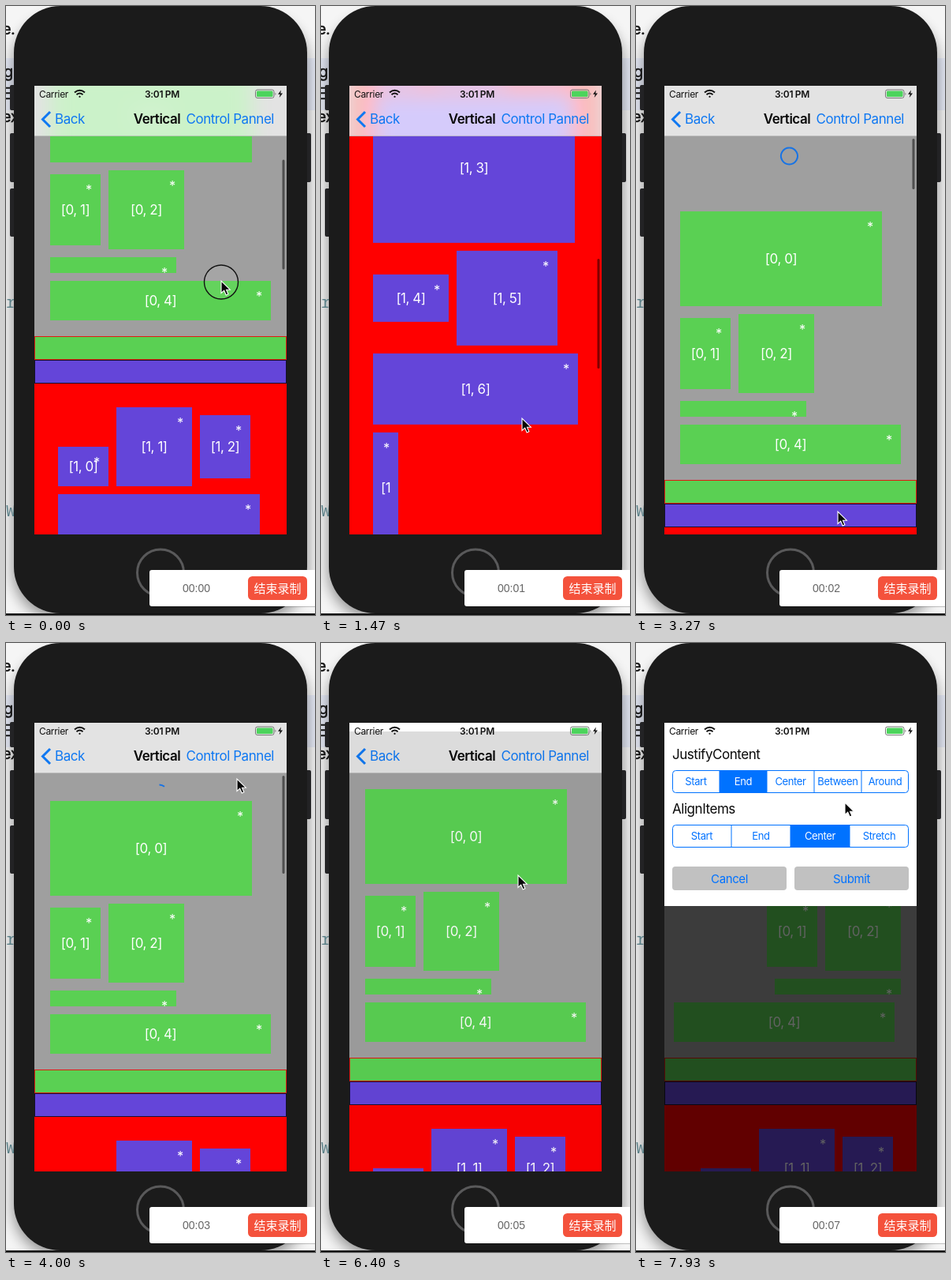
Animation of 392x771 px, one loop 8 s. Source, as an HTML page:

```html
<!DOCTYPE html>
<html lang="en">
<head>
<meta charset="utf-8">
<title>Flex layout demo</title>
<style>
  html, body { margin: 0; width: 100%; height: 100%; overflow: hidden; background: #f4f4f4; }
  svg { display: block; width: 100vw; height: 100vh; font-family: Inter, Roboto, sans-serif; }
  text { letter-spacing: -.027em; }
  .mid { text-anchor: middle; }
  .ui { font-size: 17px; }
  .code { font: 20px "Noto Sans Mono", monospace; fill: #5b8088; }
  .clock { font: 14px "Liberation Sans", Arial, sans-serif; letter-spacing: 0; }
  .stop { font: 15px "Noto Sans CJK SC", "Noto Sans CJK", sans-serif; letter-spacing: 0; }
</style>
</head>
<body>
<svg viewBox="0 0 392 771" preserveAspectRatio="none">
  <defs>
    <clipPath id="screen"><rect x="36" y="101" width="320" height="568"/></clipPath>
    <clipPath id="bar"><rect x="36" y="101" width="320" height="64"/></clipPath>
    <filter id="frost" filterUnits="userSpaceOnUse" x="0" y="50" width="392" height="170" color-interpolation-filters="sRGB">
      <feGaussianBlur stdDeviation="13"/>
      <feColorMatrix type="saturate" values="1.3"/>
    </filter>
    <filter id="soft" x="-20%" y="-10%" width="140%" height="120%"><feGaussianBlur stdDeviation="9"/></filter>
  </defs>

  <!-- desktop -->
  <rect width="392" height="771" fill="#f5f5f5"/>
  <rect y="66" width="392" height="66" fill="#e6eaf6"/>
  <rect x="9" y="14" width="374" height="762" rx="60" opacity=".42" filter="url(#soft)"/>
  <g font-size="20" fill="#111" stroke="#111" stroke-width=".4">
    <text x="-5" y="36">e.</text>
    <text x="-3" y="90">gl</text>
    <text x="-5" y="118">E</text>
    <text x="-5" y="147">ex</text>
  </g>
  <text class="code" y="382">r</text>
  <text class="code" y="646">W</text>
  <rect y="769" width="392" height="2" fill="#111"/>

  <!-- phone body -->
  <g fill="#232325">
    <rect x="5" y="100" width="8" height="32" rx="2"/>
    <rect x="5" y="161" width="8" height="62" rx="2"/>
    <rect x="5" y="231" width="8" height="61" rx="2"/>
    <rect x="379" y="161" width="8" height="62" rx="2"/>
  </g>
  <rect x="10" width="372" height="769" rx="59" fill="#1b1b1b"/>
  <circle cx="196" cy="717.5" r="29.5" fill="none" stroke="#59595a" stroke-width="3"/>

  <g clip-path="url(#screen)">
    <rect x="36" y="101" width="320" height="568" fill="#9f9f9f"/>
    <path id="spinner" fill="none" stroke="#1673e6" stroke-width="2" d="M194.5 179.5A10.5 10.5 0 1 1 194.4 179.5"/>
    <g id="content"></g>
    <rect id="thumb" x="350.5" width="3" rx="1.5"/>

    <!-- navigation bar -->
    <g clip-path="url(#bar)">
      <rect x="36" y="101" width="320" height="64" fill="#9f9f9f"/>
      <g filter="url(#frost)"><use href="#content"/></g>
      <rect x="36" y="101" width="320" height="64" fill="#fafafa" opacity=".75"/>
    </g>
    <rect x="36" y="164.5" width="320" height=".5" fill="#999"/>
    <path d="M56 134l-9.5 9.5 9.5 9.5" fill="none" stroke="#0f78f2" stroke-width="3"/>
    <g class="ui" fill="#0f78f2">
      <text x="62" y="149">Back</text>
      <text x="340" y="149" text-anchor="end">Control Pannel</text>
      <text x="191.5" y="149" class="mid" font-weight="600" fill="#080808">Vertical</text>
    </g>

    <rect id="dim" x="36" y="101" width="320" height="568"/>
    <g id="panel"></g>

    <!-- status bar -->
    <g fill="#111" font-size="12">
      <text x="42" y="115.5">Carrier</text>
      <text x="198" y="115.5" class="mid" font-weight="600">3:01 PM</text>
    </g>
    <path d="M87 109.5q6.5-5.5 13 0M89.5 112.200q4-3.300 8 0" fill="none" stroke="#111" stroke-width="2"/>
    <path d="M93.5 113.5l1.500 1.500-1.500 1-1.500-1z" fill="#111"/>
    <rect x="316.5" y="106" width="23.5" height="10.5" rx="2.5" fill="none" stroke="#777"/>
    <rect x="318" y="107.5" width="20.5" height="7.5" rx="1.3" fill="#4cd45c"/>
    <path d="M341.5 109.5v3.500q2-1.700 0-3.500z" fill="#777"/>
    <path d="M349 106.5l-4 5.300h2.700l-1 4.200 4.300-5.500h-2.800z" fill="#111"/>
  </g>

  <!-- recorder -->
  <rect x="182" y="714.5" width="214" height="46.500" rx="3" opacity=".22"/>
  <rect x="182" y="714" width="214" height="46" rx="3" fill="#fff"/>
  <text id="clock" x="241.5" y="742" class="mid clock" fill="#666"></text>
  <rect x="307" y="722" width="75" height="30" rx="5.500" fill="#f4523c"/>
  <text x="344.5" y="742.5" class="mid stop" fill="#fff">结束录制</text>

  <!-- pointer -->
  <g id="pointer">
    <circle id="touch" cy="1.500" r="21.500" fill="#fff" fill-opacity=".06" stroke="#111" stroke-width="1.400"/>
    <path d="M0 0V15.500L3.700 12.200 6.200 18 8.900 16.800 6.500 11.200H11.300Z" fill="#080808" stroke="#fff" stroke-width="1.100"/>
  </g>
</svg>

<script>
const LOOP = 8000, STEP = 1000 / 15;
const LEFT = 36, WIDTH = 320, GAP = 10, BAR = 30;
const GREEN = '#5ad053', PURPLE = '#6445d9', BLUE = '#0072ff';
const $ = id => document.getElementById(id);

function add(parent, tag, attrs, text) {
  const el = document.createElementNS('http://www.w3.org/2000/svg', tag);
  set(el, attrs);
  if (text) el.textContent = text;
  return parent.appendChild(el);
}
function set(el, attrs) {
  for (const k in attrs) el.setAttribute(k, attrs[k]);
}
const box = (parent, x, y, width, height, fill, more) =>
  add(parent, 'rect', { x, y, width, height, fill, ...more });
const label = (parent, x, y, text, size, fill) =>
  add(parent, 'text', { x, y, class: 'mid', 'font-size': size, fill }, text);

// Greedy flex wrap; items are [width, height, pinned to row end]
function wrap(items, room) {
  const rows = [];
  let row;
  items.forEach(([w, h, low], i) => {
    if (!row || row.used + GAP + w > room) rows.push(row = { used: -GAP, h: 0, cells: [] });
    row.cells.push({ i, w, h, low, x: row.used + GAP });
    row.used += GAP + w;
    row.h = Math.max(row.h, h);
  });
  return rows;
}

const content = $('content'), cells = [];

function addCell(section, { i, w, h }, x, y, shift) {
  const g = add(content, 'g', {});
  box(g, x, y, w, h, section ? PURPLE : GREEN);
  const name = w < 40 ? `[${section}` : `[${section}, ${i}]`;
  if (h > 20) label(g, x + w / 2, y + h / 2 + 6, name, 17, '#fff');
  label(g, x + w - 15, y + 25, '*', 16.5, '#fff');
  cells.push({ g, shift });
}

function addSection(section, top, inset, items) {
  const room = WIDTH - 2 * inset;
  let y = top + inset;
  for (const row of wrap(items, room)) {
    const shift = room - row.used || -8; // full rows overhang
    for (const c of row.cells)
      addCell(section, c, LEFT + inset + c.x, y + (row.h - c.h) / (c.low ? 1 : 2), shift);
    y += row.h + GAP;
  }
  return y - GAP + inset;
}

const end = addSection(0, 165, 20, [[256, 120], [64, 90], [96, 100], [160, 20], [280, 50]]);
[[GREEN, '#e01b10'], [PURPLE, '#15102e']].forEach(([fill, stroke], i) =>
  box(content, LEFT + .5, end + i * BAR + .5, WIDTH - 1, BAR - 1, fill, { stroke }));
const next = end + 2 * BAR;
box(content, LEFT, next, WIDTH, 1300, '#f00');
addSection(1, next, 30, [[64, 50, true], [96, 100], [64, 80], [256, 190], [96, 60], [128, 120],
  [260, 90], [32, 140], [256, 90], [160, 110]]);

// segmented controls and buttons
const panel = $('panel');
box(panel, LEFT, 101, WIDTH, 232, '#fff');
function segments(title, y, names) {
  add(panel, 'text', { x: 46, y: y - 14, class: 'ui', fill: '#0a0a0a' }, title);
  const w = 300 / names.length;
  const parts = names.map((name, i) => ({
    back: box(panel, 46 + i * w, y, w, 29, '#fff', { rx: i % (names.length - 1) ? 0 : 3 }),
    text: label(panel, 46 + (i + .5) * w, y + 19, name, 13, BLUE)
  }));
  for (let i = 1; i < names.length; i++) box(panel, 45.5 + i * w, y, 1, 29, BLUE);
  box(panel, 46.5, y + .5, 299, 28, 'none', { rx: 4, stroke: BLUE });
  return (chosen, pressed) => parts.forEach(({ back, text }, i) => {
    set(back, { fill: i === chosen ? BLUE : i === pressed ? '#cde4fa' : '#fff' });
    set(text, { fill: i === chosen ? '#fff' : i === pressed ? '#4d9df0' : BLUE });
  });
}
const justify = segments('JustifyContent', 161, ['Start', 'End', 'Center', 'Between', 'Around']);
segments('AlignItems', 230, ['Start', 'End', 'Center', 'Stretch'])(2);
['Cancel', 'Submit'].forEach((name, i) => {
  box(panel, 46 + 155 * i, 283, 145, 30, '#c1c1c1', { rx: 4 });
  label(panel, 118.5 + 155 * i, 303.5, name, 15, BLUE);
});

const speedUp = p => p * p;
const slowDown = p => 1 - (1 - p) ** 2;
const smooth = p => p < .5 ? 2 * p * p : 1 - 2 * (1 - p) ** 2;
const ramp = (t, a, b, ease = smooth) => ease(Math.min(1, Math.max(0, (t - a) / (b - a))));
const within = (t, a, b) => t >= a && t < b;

// finger drags speed up, flings slow down: [from, to, distance, ease]
const scrolls = [
  [0, 220, 198, speedUp], [220, 1050, 519, slowDown],
  [1200, 1440, -172, speedUp], [1440, 2370, -652, slowDown],
  [2440, 3000, -75, speedUp], [3829, 4079, 75, smooth]
];
// [from, to, x, y, ease]
const moves = [
  [0, 220, 268, 150, speedUp], [500, 1150, 258, 350], [1200, 1440, 255, 522, speedUp],
  [2440, 3000, 256, 640, speedUp], [3400, 4000, 293, 172], [4000, 4250, 288, 146],
  [4800, 5300, 134, 180], [5550, 6000, 250, 294], [6480, 7000, 285, 146], [7350, 7930, 265, 202]
];

function pointerAt(t) {
  let x = 273, y = 348;
  for (const [a, b, toX, toY, ease] of moves) {
    const p = ramp(t, a, b, ease);
    x += (toX - x) * p;
    y += (toY - y) * p;
  }
  return `${x} ${y}`;
}

function draw(t) {
  const s = scrolls.reduce((sum, [a, b, d, ease]) => sum + d * ramp(t, a, b, ease), 107);
  const shown = ramp(t, 4300, 4650) - ramp(t, 6104, 6454) + ramp(t, 7300, 7650);
  const touching = scrolls.some(([a, b, , ease]) => ease === speedUp && within(t, a, b));

  set(content, { transform: `translate(0 ${-s})` });
  cells.forEach(({ g, shift }) => set(g, { transform: `translate(${t > 6460 ? shift : 0} 0)` }));
  set($('thumb'), {
    y: 168 + Math.max(s, 0) * .247,
    height: 139 + Math.min(s, 0),
    opacity: .5 * (1 - ramp(t, 4100, 4400))
  });
  set($('spinner'), {
    'stroke-dasharray': `${Math.max(0, -s - 8)} 200`,
    visibility: s < -8 ? 'visible' : 'hidden'
  });

  justify(t < 5480 ? 0 : 1, within(t, 5330, 5480) ? 1 : -1);
  set(panel, { transform: `translate(0 ${-232 * (1 - shown)})` });
  set($('dim'), { opacity: .62 * shown });

  set($('pointer'), { transform: `translate(${pointerAt(t)})` });
  set($('touch'), { visibility: touching ? 'visible' : 'hidden' });
  $('clock').textContent = '00:0' + Math.max(0, Math.floor((t - 435) / 1000));
}

function tick() {
  const t = performance.now() % LOOP;
  draw(Math.floor((t + 5) / STEP) * STEP % LOOP);
  requestAnimationFrame(tick);
}
tick();
</script>
</body>
</html>
```
